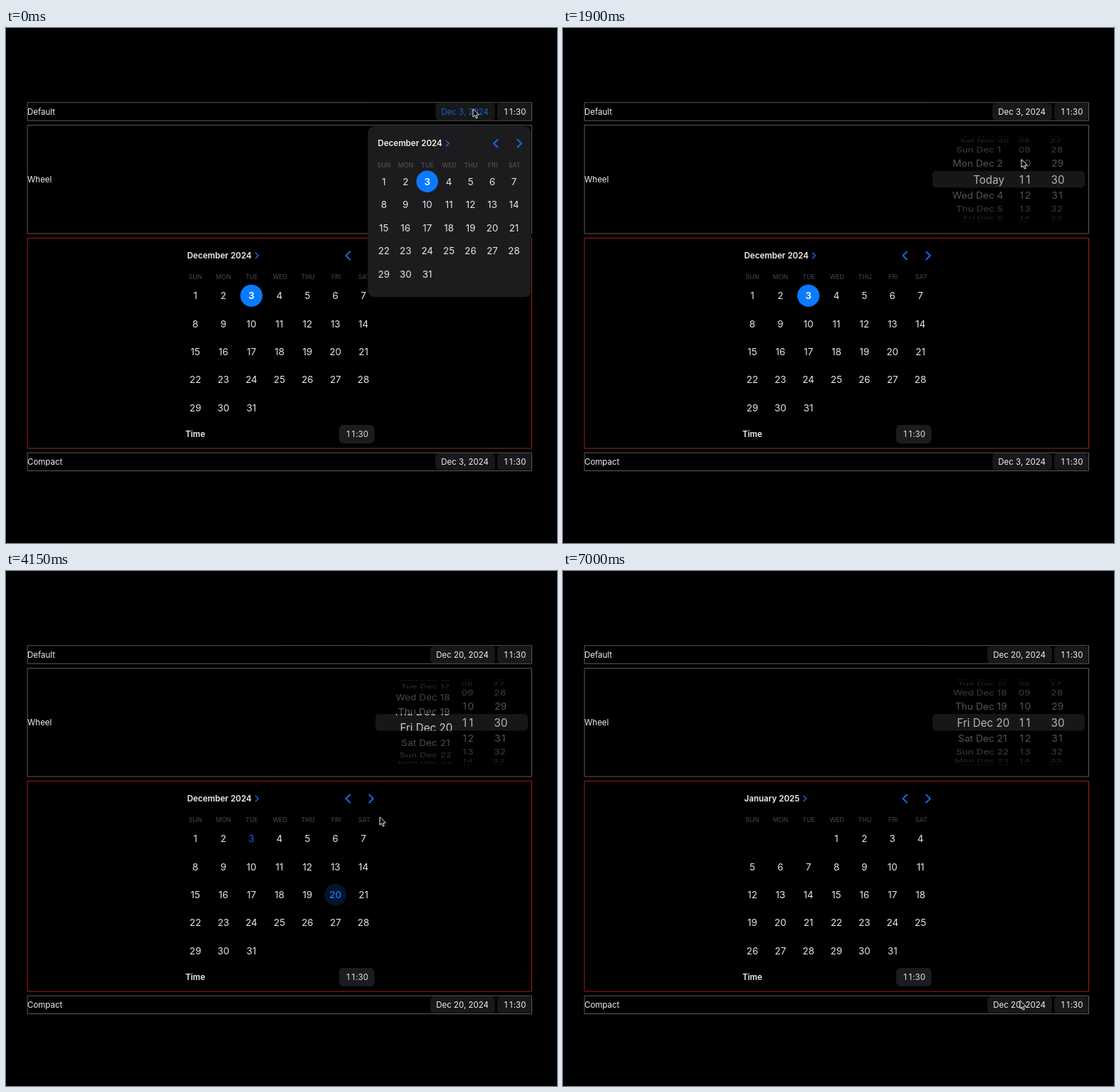
An HTML page with a canvas for the animation above (7.15 s loop, 774 by 724 pixels).

```html
<!DOCTYPE html>
<html lang="en">
<head>
<meta charset="utf-8">
<title>Date pickers</title>
<style>
  html, body { margin: 0; width: 100%; height: 100%; overflow: hidden; background: #000; }
  canvas { display: block; }
</style>
</head>
<body>
<canvas id="stage" width="774" height="724"></canvas>
<script>
const ctx = document.getElementById('stage').getContext('2d');
const LOOP = 7150;
const FAMILY = 'Inter, "Liberation Sans", sans-serif';
const BLUE = '#1769dc', WHITE = '#f0f0f0', PILL = '#18181a';
const DAYS = ['Sun', 'Mon', 'Tue', 'Wed', 'Thu', 'Fri', 'Sat'];
const STEP = 0.382, RADIUS = 59.6, MID = 213;

// time, x, y
const POINTER = [
  [0, 656, 114], [100, 656, 114], [350, 712, 101], [600, 735, 120], [900, 735, 120],
  [1200, 742, 112], [1500, 740, 122], [1850, 644, 185], [2000, 644, 185],
  [2300, 614, 262], [2700, 617, 243], [2850, 617, 243], [2900, 617, 242],
  [3200, 612, 210], [3350, 615, 262], [3700, 612, 205], [4150, 525, 346],
  [4400, 513, 322], [4750, 513, 322], [5250, 642, 604]
];
// time, days past the first date
const SPIN = [
  [2300, 0], [2700, 7.7], [2850, 7.7], [2900, 7.74], [3100, 8], [3400, 8],
  [3700, 15], [4000, 16.6], [4150, 16.67], [4300, 17]
];

const smooth = p => p * p * (3 - 2 * p);
const ease = (t, a, b) => smooth(Math.min(1, Math.max(0, (t - a) / (b - a))));

function track(keys, t) {
  if (t <= keys[0][0]) return keys[0].slice(1);
  for (let i = 1; i < keys.length; i++) {
    const a = keys[i - 1], b = keys[i];
    if (t < b[0]) {
      const p = ease(t, a[0], b[0]);
      return a.slice(1).map((v, n) => v + (b[n + 1] - v) * p);
    }
  }
  return keys[keys.length - 1].slice(1);
}

// y is the middle of the capital letters
function text(str, x, y, size, color = WHITE, align = 'left', weight = 400) {
  ctx.font = `${weight} ${size}px ${FAMILY}`;
  ctx.textAlign = align;
  ctx.fillStyle = color;
  ctx.fillText(str, x, y + size * 0.364);
}

// digits on equal advances, centred at x
function digits(str, x, y, size, color = WHITE) {
  const adv = c => size * (c === ':' ? 0.28 : 0.62);
  let left = x - [...str].reduce((w, c) => w + adv(c), 0) / 2;
  for (const c of str) {
    text(c, left + adv(c) / 2, y, size, color, 'center');
    left += adv(c);
  }
}

function box(x, y, w, h, r, color) {
  ctx.fillStyle = color;
  ctx.beginPath();
  ctx.roundRect(x, y, w, h, r);
  ctx.fill();
}

function frame(y, h, color = '#5c5c5c') {
  ctx.strokeStyle = color;
  ctx.lineWidth = 1;
  ctx.strokeRect(30.5, y, 708, h);
}

// dir 1 points right, -1 left
function chevron(x, y, w, h, dir, width) {
  ctx.strokeStyle = BLUE;
  ctx.lineWidth = width;
  ctx.lineCap = ctx.lineJoin = 'round';
  ctx.beginPath();
  ctx.moveTo(x - dir * w / 2, y - h / 2);
  ctx.lineTo(x + dir * w / 2, y);
  ctx.lineTo(x - dir * w / 2, y + h / 2);
  ctx.stroke();
}

function heading(title, x, y, prev, next) {
  text(title, x, y, 11.6, WHITE, 'left', 600);
  chevron(x + ctx.measureText(title).width + 7.5, y, 3.8, 7.4, 1, 1.6);
  chevron(prev, y, 5.6, 11, -1, 2);
  chevron(next, y, 5.6, 11, 1, 2);
}

function weekdays(x, y, gap, color) {
  DAYS.forEach((d, i) => text(d.toUpperCase(), x + i * gap, y, 8.8, color, 'center', 500));
}

function month(x, y, dx, dy, first, selected, today) {
  for (let d = 1; d <= 31; d++) {
    const cell = first + d - 1;
    const cx = x + cell % 7 * dx, cy = y + Math.floor(cell / 7) * dy;
    let color = '#e6e6e6', weight = 400;
    if (d === today) color = BLUE;
    if (d === selected) {
      const now = d === today;
      ctx.fillStyle = now ? '#0a7aff' : 'rgba(10,122,255,0.16)';
      ctx.beginPath();
      ctx.arc(cx, cy, Math.min(15.6, dx / 2), 0, 7);
      ctx.fill();
      color = now ? '#fff' : '#0f72ea';
      weight = 600;
    }
    text(String(d), cx, cy, 13.4, color, 'center', weight);
  }
}

function pills(y, date, active) {
  ctx.font = `400 11.5px ${FAMILY}`;
  const w = ctx.measureText(date).width;
  box(670 - w, y - 11.8, w + 17, 23.6, 5, PILL);
  box(690, y - 11.8, 48.5, 23.6, 5, PILL);
  text(date, 678, y, 11.5, active ? '#1a62c8' : WHITE, 'right');
  digits('11:30', 714.5, y, 11.5);
}

function dateRow(i, size, color) {
  const date = new Date(Date.UTC(2024, 11, 3 + i));
  if (i === 0) {
    text('Today', 620, 0, size, color, 'right');
    return;
  }
  const name = DAYS[date.getUTCDay()] + (date.getUTCMonth() === 10 ? ' Nov ' : ' Dec ');
  const x = size > 14.5 ? 608.5 : 609.5;
  text(name, x, 0, size, color, 'right');
  text(String(date.getUTCDate()), x, 0, size, color);
}

const countRow = (x, base) => (i, size, color) =>
  digits(String(base + i).padStart(2, '0'), x, 0, size, color);

function column(pos, row) {
  const near = Math.round(pos);
  // the drum outside the lens
  ctx.save();
  ctx.beginPath();
  ctx.rect(515, 150, 222, 51);
  ctx.rect(515, 224.5, 222, 51);
  ctx.clip();
  for (let i = near - 4; i <= near + 4; i++) {
    const a = (i - pos) * STEP, c = Math.cos(a);
    if (Math.abs(a) > 1.56) continue;
    const g = Math.round(28 + 66 * c * c);
    ctx.save();
    ctx.translate(625, MID + RADIUS * Math.sin(a));
    ctx.scale(1 - 0.07 * (1 - c), Math.max(0.1, c));
    ctx.translate(-625, 0);
    row(i, 13.8, `rgb(${g},${g},${g})`);
    ctx.restore();
  }
  ctx.restore();
  // the larger row inside the lens
  const moving = Math.abs(pos - near) > 0.01;
  ctx.save();
  ctx.beginPath();
  ctx.rect(515, 201, 222, 23.5);
  ctx.clip();
  for (let i = near - 1; i <= near + 1; i++) {
    ctx.save();
    ctx.translate(0, MID + (i - pos) * 22.5);
    row(i, 15.2, moving ? '#cfcfcf' : '#b4b4b4');
    ctx.restore();
  }
  ctx.restore();
}

function wheel(pos) {
  box(519, 201, 214, 23.5, 5, '#17171a');
  column(pos, dateRow);
  column(0, countRow(648.7, 11));
  column(0, countRow(695, 30));
}

function inline(t, day) {
  const slide = ease(t, 4500, 4850);
  heading(slide < 0.5 ? 'December 2024' : 'January 2025', 254.5, 320, 480.3, 513);
  weekdays(266, 350, 39.55, '#3e3e40');
  ctx.save();
  ctx.beginPath();
  ctx.rect(246, 358, 276, 194);
  ctx.clip();
  if (slide < 1) month(266 - 276 * slide, 376.3, 39.35, 39.35, 0, day, 3);
  if (slide > 0) month(266 + 276 * (1 - slide), 376.3, 39.35, 39.35, 3, 0, 0);
  ctx.restore();
  text('Time', 252, 571, 11.5, WHITE, 'left', 600);
  box(468, 558, 49.5, 26, 6, '#1c1c1e');
  digits('11:30', 493, 571, 11.5, '#e0e0e0');
}

function popover(top, anchor, open, day) {
  if (open <= 0) return;
  ctx.save();
  ctx.globalAlpha = open;
  ctx.translate(645, anchor);
  ctx.scale(0.4 + 0.6 * open, 0.4 + 0.6 * open);
  ctx.translate(-645, -anchor);
  box(508.3, top, 229, 240.3, 9, '#1c1c1e');
  heading('December 2024', 522.3, top + 24.2, 688, 721.2);
  weekdays(531, top + 55.2, 30.55, '#505053');
  month(530.8, top + 77.8, 30.45, 32.6, 0, day, 3);
  ctx.restore();
}

function pointer(x, y) {
  ctx.save();
  ctx.translate(x, y);
  ctx.beginPath();
  for (const [px, py] of [[0, 0], [0, 11], [2.6, 8.8], [4.4, 13], [6.3, 12.2], [4.5, 8.2], [8, 8]])
    ctx.lineTo(px, py);
  ctx.closePath();
  ctx.fillStyle = '#000';
  ctx.fill();
  ctx.strokeStyle = '#f2f2f2';
  ctx.lineWidth = 1;
  ctx.lineJoin = 'miter';
  ctx.stroke();
  ctx.restore();
}

function draw(t) {
  const day = t < 3050 ? 3 : t < 3850 ? 11 : 20;
  const date = `Dec ${day}, 2024`;
  ctx.fillStyle = '#000';
  ctx.fillRect(0, 0, 774, 724);

  pills(117.7, date, t < 200);
  pills(609.8, date, t >= 5350 && t < 6150);
  frame(104.8, 25.4);
  frame(136.7, 152.3);
  frame(295.2, 295.8, '#a0211a');
  frame(597.2, 25.3);
  text('Default', 30, 117.7, 11.5);
  text('Wheel', 30, 213, 11.5);
  text('Compact', 30, 609.8, 11.5);

  wheel(track(SPIN, t)[0]);
  inline(t, day);
  popover(138, 130, 1 - ease(t, 200, 450), 3);
  popover(350.8, 598, ease(t, 5350, 5600) * (1 - ease(t, 6150, 6400)), 20);
  pointer(...track(POINTER, t));
}

const start = performance.now();
function tick() {
  draw((performance.now() - start) % LOOP);
  requestAnimationFrame(tick);
}
tick();
</script>
</body>
</html>
```
